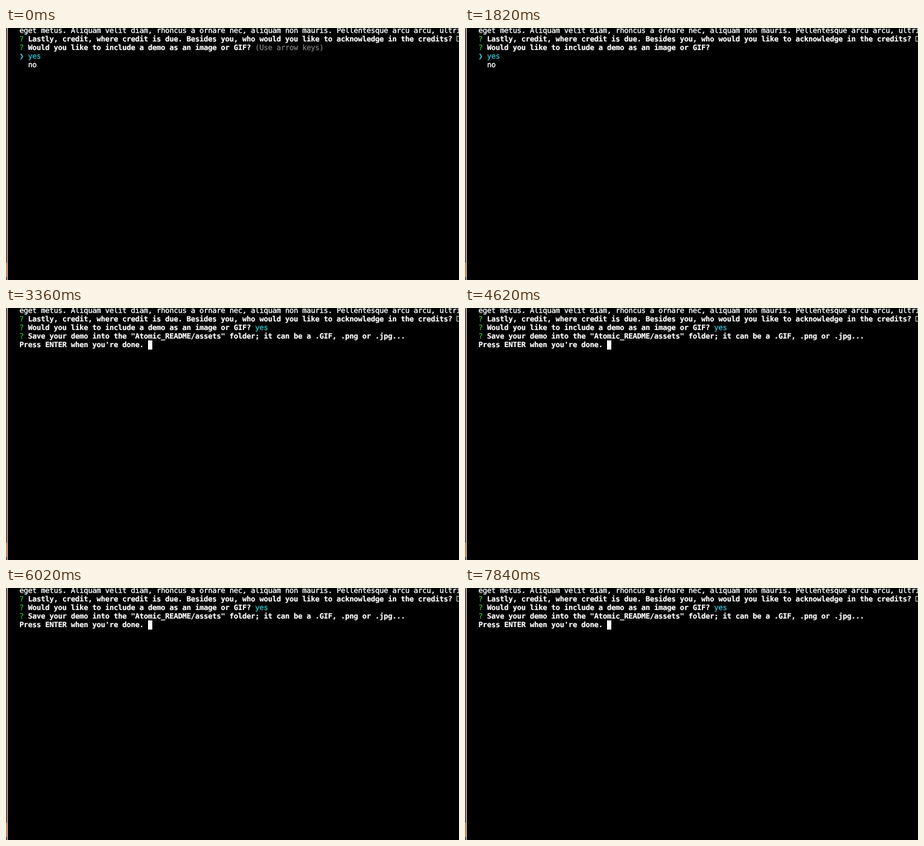
Write an HTML page that moves like this. It is 740 by 412 pixels and loops after 8 s.

```html
<!DOCTYPE html>
<html lang="en">
<head>
<meta charset="utf-8">
<title>Terminal prompt</title>
<style>
  html, body { margin: 0; width: 100%; height: 100%; overflow: hidden; background: #000; }
  svg { display: block; }
  text {
    --ink: #fff;
    font: 12px "DejaVu Sans Mono", monospace;
    letter-spacing: calc(7px - 1ch); /* 7px terminal cells */
    text-rendering: geometricPrecision;
    fill: var(--ink);
    stroke: var(--ink);
    stroke-width: .35px; /* heavier smoothing */
  }
  .bold { font-weight: bold; stroke-width: .2px; }
  .mark { --ink: #25b035; }
  .pick { --ink: #35bfc6; }
  .dim { --ink: #777; }

  .hint, .menu, .answer { animation: 8s step-end infinite; }
  .hint { animation-name: hint; }
  .menu { animation-name: menu; }
  .answer { animation-name: answer; }
  @keyframes hint { 0% { opacity: 1; } 7%, 100% { opacity: 0; } }
  @keyframes menu { 0% { opacity: 1; } 38.5%, 100% { opacity: 0; } }
  @keyframes answer { 0% { opacity: 0; } 38.5%, 100% { opacity: 1; } }
</style>
</head>
<body>
<svg width="740" height="412" viewBox="0 0 740 412">
  <!-- window edge -->
  <rect width="1" height="412" fill="#2c2c2c"/>
  <rect x="1" width="1" height="412" fill="#8c746c"/>
  <rect x="2" width="1" height="412" fill="#e6c2b5"/>
  <rect y="384" width="2" height="23" fill="#b98258"/>

  <text x="22" y="8">eget metus. Aliquam velit diam, rhoncus a ornare nec, aliquam non mauris. Pellentesque arcu arcu, ultrices</text>

  <text class="mark" x="22" y="22">?</text>
  <text class="bold" x="36" y="22">Lastly, credit, where credit is due. Besides you, who would you like to acknowledge in the credits?</text>
  <rect x="736.5" y="13.5" width="6" height="8" fill="none" stroke="#ddd"/>

  <text class="mark" x="22" y="36">?</text>
  <text class="bold" x="36" y="36">Would you like to include a demo as an image or GIF?</text>
  <text class="dim hint" x="407" y="36">(Use arrow keys)</text>

  <g class="menu">
    <text class="pick" x="22" y="50">❯</text>
    <text class="pick" x="36" y="50">yes</text>
    <text x="36" y="64">no</text>
  </g>

  <g class="answer">
    <text class="pick" x="407" y="36">yes</text>
    <text class="mark" x="22" y="50">?</text>
    <text class="bold" x="36" y="50">Save your demo into the "Atomic_README/assets" folder; it can be a .GIF, .png or .jpg...</text>
    <text class="bold" x="22" y="64">Press ENTER when you're done.</text>
    <rect x="232" y="53" width="7" height="15" fill="#fff"/>
  </g>
</svg>
</body>
</html>
```
